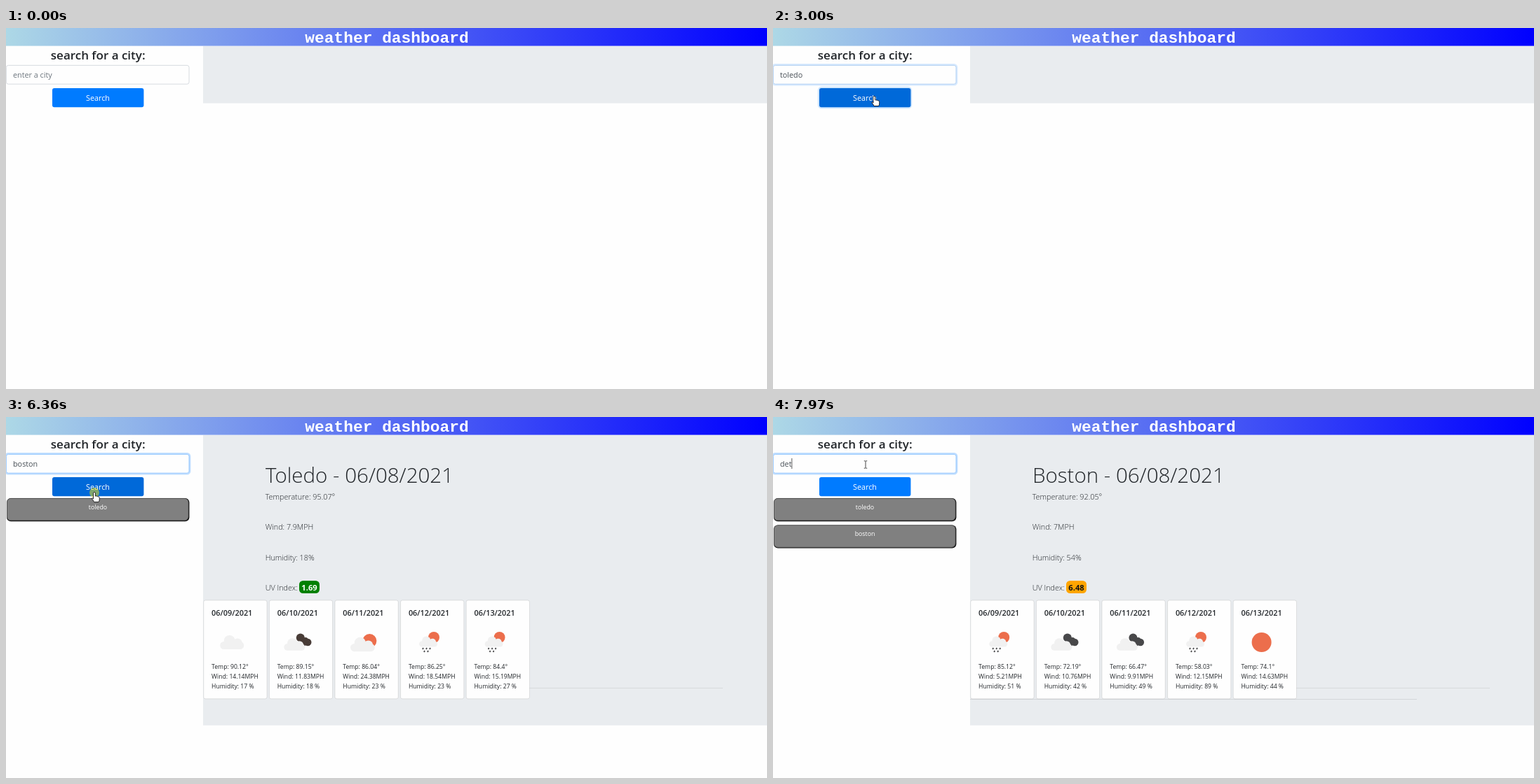
Write an HTML page that moves like this. It is 1085 px wide and 516 px high and loops after 8 s.

```html
<!DOCTYPE html>
<html lang="en">
<head>
<meta charset="utf-8">
<title>weather dashboard</title>
<style>
html, body { margin: 0; width: 100%; height: 100%; overflow: hidden; background: #fefefe; }
svg { display: block; width: 100vw; height: 100vh; font: 10.8px "Open Sans", "Noto Sans", sans-serif; fill: #212529; }
.title { font: bold 22.9px "Liberation Mono", "Courier New", monospace; fill: #fff; }
.mid { text-anchor: middle; }
.label { font-size: 17px; font-weight: 600; }
.city { font-size: 29.5px; font-weight: 300; }
.lead { font-weight: 300; }
.uv { font-size: 11.2px; font-weight: 700; }
.date { font-size: 10.9px; font-weight: 600; }
.small { font-size: 8.65px; }
</style>
</head>
<body>
<svg id="stage" viewBox="0 0 1085 516" xmlns="http://www.w3.org/2000/svg"></svg>
<script>
const LOOP = 8000;
const stage = document.getElementById('stage');
const get = id => document.getElementById(id);
const clamp = v => Math.max(0, Math.min(1, v));

const rect = (x, y, w, h, fill, more = '') =>
  `<rect x="${x}" y="${y}" width="${w}" height="${h}" fill="${fill}" ${more}/>`;
const circle = (x, y, r, fill) => `<circle cx="${x}" cy="${y}" r="${r}" fill="${fill}"/>`;
const text = (x, y, str, cls = '', more = '') => `<text x="${x}" y="${y}" class="${cls}" ${more}>${str}</text>`;
const place = (x, y, scale, body) => `<g transform="translate(${x} ${y}) scale(${scale})">${body}</g>`;

// Weather icons, centred on 0,0
const SUN = '#ec6e4c', PALE = '#f1f1f1';
const cloud = rect(-17, -1, 34, 11, PALE, 'rx="5.5"') + circle(-3.5, -2, 8, PALE) + circle(8, 1, 6.5, PALE);
const darkCloud = c => circle(4, -6.5, 6, c) + circle(14.5, 0, 5.2, c) + circle(8, 0, 5.5, c) + circle(11, -3, 4, c);
const drops = [[-8, 8], [-3, 8], [2, 8], [-6, 12], [-1, 12]]
  .map(([x, y]) => `<path d="M${x} ${y}l-1 2" stroke="#48484a" stroke-width="1.8"/>`).join('');
const icons = {
  cloud,
  brown: darkCloud('#483c37') + place(-4.5, 3, .88, cloud),
  dark: darkCloud('#48484a') + place(-4.5, 3, .88, cloud),
  partly: circle(9, -2, 10, SUN) + place(-1, 3, 1.02, cloud),
  rain: circle(7, -7, 8, SUN) + place(-1, -1, .76, cloud) + drops,
  sun: circle(0, 0, 14, SUN)
};

const reports = [
  {
    city: 'Toledo', lines: ['Temperature: 95.07°', 'Wind: 7.9MPH', 'Humidity: 18%'],
    uv: ['1.69', 'green', '#fff'],
    days: [['cloud', '90.12', '14.14', 17], ['brown', '89.15', '11.83', 18], ['partly', '86.04', '24.38', 23],
      ['rain', '86.25', '18.54', 23], ['rain', '84.4', '15.19', 27]]
  },
  {
    city: 'Boston', lines: ['Temperature: 92.05°', 'Wind: 7MPH', 'Humidity: 54%'],
    uv: ['6.48', 'orange', '#111'],
    days: [['rain', '85.12', '5.21', 51], ['dark', '72.19', '10.76', 42], ['dark', '66.47', '9.91', 49],
      ['rain', '58.03', '12.15', 89], ['sun', '74.1', '14.63', 44]]
  }
];

function dayCard([icon, temp, wind, humidity], i) {
  return place(281.8 + 93.6 * i, 0, 1,
    rect(0, 262, 90.2, 140.8, '#fefefe', 'rx="2.5" stroke="#000" stroke-opacity=".125" stroke-width=".8"') +
    text(11.3, 284, `06/${String(9 + i).padStart(2, '0')}/2021`, 'date') +
    place(40.4, 322, 1, icons[icon]) +
    text(11.3, 360.3, `Temp: ${temp}°`, 'small') +
    text(11.3, 374.2, `Wind: ${wind}MPH`, 'small') +
    text(11.3, 387.9, `Humidity: ${humidity} %`, 'small'));
}

const summary = r => text(370, 94.3, `${r.city} - 06/08/2021`, 'city') +
  r.lines.map((line, i) => text(369.7, 118 + 43.3 * i, line, 'lead')).join('');

const forecast = (r, i) => rect(746, 387, 276, .8, '#000', 'opacity=".1"') +
  (i ? rect(281, 403, 637, .8, '#000', 'opacity=".12"') : '') +
  text(369.7, 248, 'UV Index:', 'lead') +
  rect(418, 234, 29, 18, r.uv[1], 'rx="5.5"') +
  text(432.5, 247.5, r.uv[0], 'uv mid', `style="fill:${r.uv[2]}"`) +
  r.days.map(dayCard).join('');

const historyButton = (i, city) => `<g id="past${i}">` +
  rect(1, 116 + 38.4 * i, 260.4, 33.2, '#111', 'rx="6"') +
  rect(1.4, 116.4 + 38.4 * i, 258.6, 31.4, '#808080', 'rx="5.5" stroke="#555" stroke-width=".7"') +
  text(131, 131.7 + 38.4 * i, city, 'mid', 'style="fill:#fff;font-size:8.8px"') + '</g>';

stage.innerHTML = `
  <defs><linearGradient id="sky"><stop stop-color="lightblue"/><stop offset="1" stop-color="blue"/></linearGradient></defs>
  ${rect(0, 0, 1085, 516, '#fefefe')}
  ${rect(0, 0, 1085, 25.6, 'url(#sky)')}
  ${text(543, 21, 'weather dashboard', 'title mid')}
  ${rect(281, 26, 804, 81.5, '#e9ecef', 'id="panel"')}
  ${reports.map((r, i) => `<g id="sum${i}">${summary(r)}</g><g id="cast${i}">${forecast(r, i)}</g>`).join('')}
  ${text(131.2, 45, 'search for a city:', 'label mid')}
  ${rect(-.8, 52.2, 263, 29.2, 'none', 'id="inputRing" rx="4" stroke="#007bff" stroke-width="2.3"')}
  ${rect(.4, 53.4, 260.6, 26.8, '#fefefe', 'id="input" rx="2.9" stroke-width=".8"')}
  ${rect(10, 58.5, 0, 16.5, '#3390ff', 'id="selection"')}
  ${text(10, 71, '', '', 'id="field"')}
  <path id="squiggle" fill="none" stroke="#d6204a" stroke-width=".9"/>
  ${rect(0, 59, .8, 15, '#333', 'id="caret"')}
  ${rect(65, 85, 132, 29.2, 'none', 'id="buttonRing" rx="4" stroke="#268fff" stroke-width="2.3"')}
  ${rect(66, 86, 130.4, 27.2, '#007bff', 'id="button" rx="2.9"')}
  ${text(131, 104, 'Search', 'mid', 'style="fill:#fff"')}
  ${reports.map((r, i) => historyButton(i, r.city.toLowerCase())).join('')}
  <g id="pointer">
    <circle id="press" r="7" fill="#ffe600" opacity=".5"/>
    <path id="arrow" d="M0 0V13l3-3 2 5 2-1-2-4.7h4z" fill="#fff" stroke="#000" stroke-width=".8"/>
    <path id="beam" d="M-2.2-5.2h1.7l.5.5.5-.5h1.7M0-4.7V4.7M-2.2 5.2h1.7l.5-.5.5.5h1.7" fill="none" stroke="#333" stroke-width=".9"/>
    <path id="hand" d="M-1.5 8V.8a1.4 1.4 0 0 1 2.8 0V5q2.5-.3 3.6.6 2.3 0 2.3 2V10q0 2-1.2 3.5H-.5q-1-2.5-3.4-5 1-1.3 2.4.5z" fill="#fff" stroke="#000" stroke-width=".8"/>
  </g>`;

// Timeline, in milliseconds
const inputFocus = [[680, 2940], [3760, 6420], [6900, 9999]];
const buttonFocus = [[2940, 3760], [6420, 6900]];
const buttonHover = [[2530, 3600], [6100, 6580]];
const caretOn = [[680, 1210], [1330, 2460], [3760, 4290], [4950, 6010], [6900, 7100], [7430, 9999]];
const selected = [[4420, 4950], [7100, 7430]];
const presses = [[600, 740], [2870, 3000], [3690, 3820], [6330, 6430], [6830, 6960]];
const summaryOn = [[[3070, 6560]], [[6560, 9999]]];
const forecastOn = [[[3330, 6560]], [[6690, 9999]]];
const words = [
  ['toledo', [1330, 1450, 1570, 1690, 1810, 1930]],
  ['boston', [4950, 5150, 5230, 5310, 5400, 5480]],
  ['det', [7430, 7630, 7970]]
];
const route = [
  [70, 1030, 474], [280, 760, 330], [480, 300, 120], [560, 165, 50], [620, 146, 77],
  [2390, 146, 77], [2600, 144.5, 98], [3530, 144.5, 98], [3740, 134, 71],
  [6010, 134, 71], [6200, 126, 108], [6490, 126, 108], [6690, 132, 68], [LOOP, 132, 68]
];

const within = (t, spans) => spans.some(([a, b]) => t >= a && t < b);
const fade = (t, spans) => spans.reduce((sum, [a, b]) => sum + clamp((t - a) / 150) - clamp((t - b) / 150), 0);
const mix = (from, to, k) => `rgb(${from.map((v, i) => Math.round(v + (to[i] - v) * k))})`;
const set = (id, attrs) => { for (const key in attrs) get(id).setAttribute(key, attrs[key]); };
const show = (id, on) => set(id, { visibility: on ? 'visible' : 'hidden' });

function pointerAt(t) {
  const i = Math.max(1, route.findIndex(p => p[0] > t));
  const [a, b] = [route[i - 1], route[i]];
  const k = clamp((t - a[0]) / (b[0] - a[0]));
  return [a[1] + (b[1] - a[1]) * k, a[2] + (b[2] - a[2]) * k];
}

function drawField(t) {
  const current = words.filter(w => w[1][0] <= t).pop();
  const typed = current ? current[0].slice(0, current[1].filter(s => s <= t).length) : '';
  const field = get('field');
  const content = typed || 'enter a city';
  if (field.textContent !== content) field.textContent = content;
  const width = typed ? field.getComputedTextLength() : 0;
  const marked = within(t, selected);
  field.style.fill = marked ? '#fff' : typed ? '#495057' : '#6c757d';
  set('selection', { width });
  show('selection', marked);
  set('squiggle', { d: 'M10 73.8' + 'l1.4-1.3 1.4 1.3'.repeat(Math.floor(width / 2.8)) });
  show('squiggle', marked);
  set('caret', { x: 10 + width });
  show('caret', within(t, caretOn));
}

function drawPointer(t) {
  const [x, y] = pointerAt(t);
  const onInput = x < 262 && y > 53 && y < 81;
  const onButton = x > 66 && x < 197 && y > 86 && y < 114;
  const visible = t >= 70;
  set('pointer', { transform: `translate(${x} ${y})` });
  show('beam', visible && onInput);
  show('hand', visible && onButton);
  show('arrow', visible && !onInput && !onButton);
  show('press', within(t, presses));
}

function render(t) {
  const focus = fade(t, inputFocus);
  set('input', { stroke: mix([206, 212, 218], [128, 189, 255], focus) });
  set('inputRing', { 'stroke-opacity': .25 * focus });
  set('buttonRing', { 'stroke-opacity': .5 * fade(t, buttonFocus) });
  set('button', { fill: mix([0, 123, 255], [0, 105, 217], fade(t, buttonHover)) });
  reports.forEach((r, i) => {
    show('sum' + i, within(t, summaryOn[i]));
    show('cast' + i, within(t, forecastOn[i]));
    show('past' + i, t >= summaryOn[i][0][0]);
  });
  const full = forecastOn.some(spans => within(t, spans));
  set('panel', { height: full ? 414.7 : t >= 3070 ? 254 : 81.5 });
  drawField(t);
  drawPointer(t);
}

const start = performance.now();
function tick() {
  render((performance.now() - start) % LOOP);
  requestAnimationFrame(tick);
}
tick();
</script>
</body>
</html>
```
